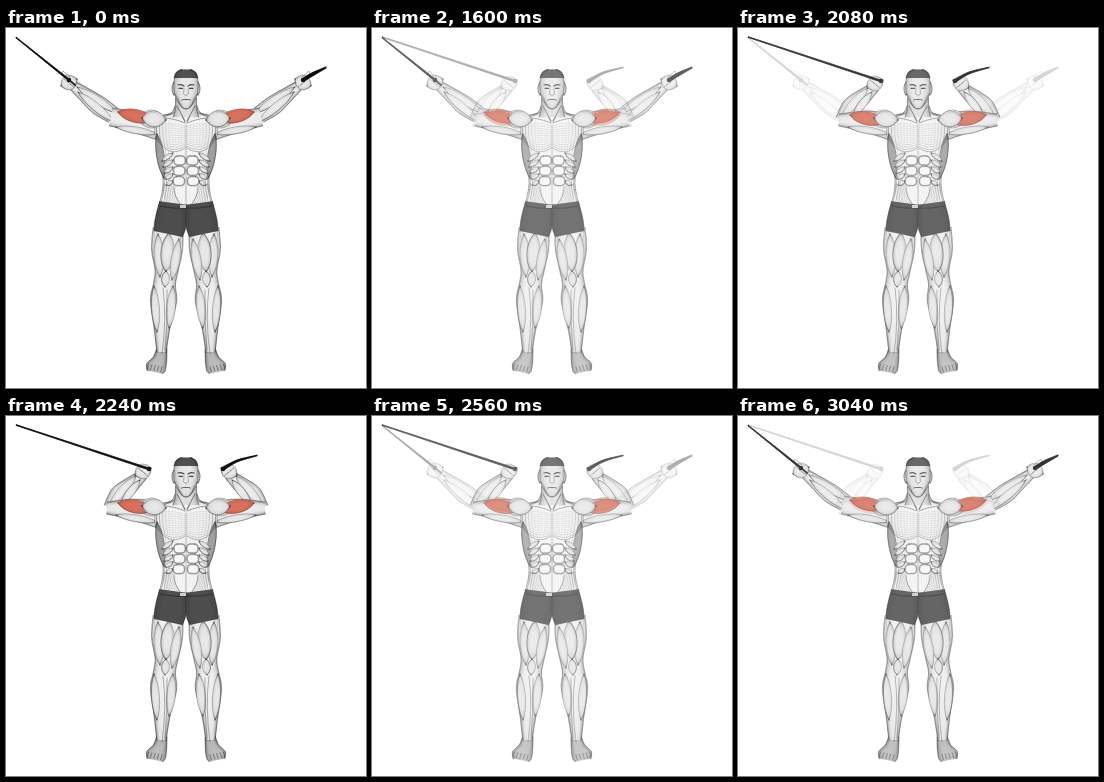
These frames come from a looping animation (360x360 px, 3200 ms). An HTML page with a canvas:

```html
<!DOCTYPE html>
<html lang="en">
<head>
<meta charset="utf-8">
<style>
  html, body { margin: 0; width: 100%; height: 100%; overflow: hidden; background: #fff; }
  canvas { display: block; width: 360px; height: 360px; }
</style>
</head>
<body>
<canvas id="stage"></canvas>
<script>
const SIZE = 360, LOOP = 3200, HOLD = 1440, STEP = 160, FADE_STEPS = 6;
const SKIN = '#f7f7f7', RED = '#dd7864', BLACK = '#111';
const dpr = window.devicePixelRatio || 1;
let g;

function sizeCanvas(canvas) {
  canvas.width = canvas.height = SIZE * dpr;
  const context = canvas.getContext('2d');
  context.scale(dpr, dpr);
  context.lineCap = context.lineJoin = 'round';
  return context;
}

function stroke(path, alpha, width = .6, rgb = '20,20,20') {
  g.lineWidth = width;
  g.strokeStyle = `rgba(${rgb},${alpha})`;
  g.stroke(path);
}

const line = (d, alpha = .6, width = .7) => stroke(new Path2D(d), alpha, width);

function fill(path, color) {
  g.fillStyle = color;
  g.fill(path);
}

// Smooth curve through all points, appended to the path.
function trace(path, points) {
  path.lineTo(...points[0]);
  for (let i = 0; i < points.length - 1; i++) {
    const a = points[i], b = points[i + 1];
    const before = points[i - 1] || a, after = points[i + 2] || b;
    path.bezierCurveTo(
      a[0] + (b[0] - before[0]) / 6, a[1] + (b[1] - before[1]) / 6,
      b[0] - (after[0] - a[0]) / 6, b[1] - (after[1] - a[1]) / 6, ...b);
  }
  return path;
}

// Stations are [x, y, radius]; u = -1 and 1 give the two sides.
function rail(stations, u) {
  return stations.map(([x, y, radius], i) => {
    const a = stations[i - 1] || stations[i], b = stations[i + 1] || stations[i];
    const dx = b[0] - a[0], dy = b[1] - a[1], k = radius * u / Math.hypot(dx, dy);
    return [x - dy * k, y + dx * k];
  });
}

// Tapered tube with engraved lines that darken towards its sides.
function limb(stations, color = SKIN, edge = .42) {
  const outline = trace(new Path2D(), rail(stations, -1));
  trace(outline, rail(stations, 1).reverse());
  outline.closePath();
  fill(outline, color);
  for (let u = -.95; u < 1; u += .1) {
    stroke(trace(new Path2D(), rail(stations, u)), .05 + edge * u ** 4, .9);
  }
  stroke(trace(new Path2D(), rail(stations, -1)), .65);
  stroke(trace(new Path2D(), rail(stations, 1)), .65);
}

// Spindle of strands between two tendons.
function muscle(x1, y1, x2, y2, width, color = SKIN, rgb = '20,20,20') {
  const dx = x2 - x1, dy = y2 - y1, length = Math.hypot(dx, dy);
  const strand = (path, u, flip) => {
    const k = width * u * 4 / 3 / length;
    const at = s => [x1 + dx * s - dy * k, y1 + dy * s + dx * k];
    if (flip) path.bezierCurveTo(...at(.78), ...at(.22), x1, y1);
    else { path.moveTo(x1, y1); path.bezierCurveTo(...at(.22), ...at(.78), x2, y2); }
    return path;
  };
  fill(strand(strand(new Path2D(), 1), -1, true), color);
  const gap = Math.min(.4, 1.3 / width);
  for (let u = -1; u <= 1; u += gap) stroke(strand(new Path2D(), u), .14 + .4 * u ** 4, .6, rgb);
  stroke(strand(new Path2D(), 1), .55, .6, rgb);
}

function bothSides(draw) {
  draw();
  g.save();
  g.translate(SIZE, 0);
  g.scale(-1, 1);
  draw();
  g.restore();
}

function leg() {
  limb([[156, 320, 5], [154, 331, 7], [150, 339, 10], [149, 344, 8]], '#c4c4c4');
  for (let toe = 0; toe < 5; toe++) {
    line(`M${141 + toe * 3.4} ${341 + toe * .7}l1.5 -5`, .6);
  }
  limb([[162, 200, 15], [161, 222, 15.5], [160.5, 243, 11.5], [158.5, 256, 11],
    [157.5, 273, 13.2], [156, 300, 8], [155.5, 324, 4.7]]);
  muscle(152, 206, 154, 249, 5);
  muscle(163, 205, 160, 244, 6.5);
  muscle(173, 211, 166, 252, 4.5);
  muscle(160, 243, 159, 259, 4);
  muscle(148, 258, 151, 304, 4);
  muscle(167, 258, 163, 300, 4.5);
  line('M157 260Q161 290 156 326M161 262Q162 292 159 322', .45);
}

function torso() {
  limb([[180, 78, 11], [180, 85, 15], [180, 90, 29], [180, 106, 31], [180, 124, 27],
    [180, 145, 24], [180, 158, 23], [180, 178, 27]]);
  bothSides(() => {
    muscle(151, 106, 158, 150, 4, '#aaa');
    for (let i = 0; i < 5; i++) muscle(156 + i, 133 + i * 6, 167, 125 + i * 7, 2.3);
    for (let i = 0; i < 7; i++) {
      line(`M${157 + i * 1.5} 156Q${156 + i * 2} 168 ${162 + i * 2} 176`, .28, .5);
    }
    // Chest strands spread from the armpit to the breastbone.
    for (let t = 0; t <= 1; t += .08) {
      line(`M150 ${98 + 12 * t}Q162 ${93 + 40 * t} 179 ${98 + 23 * t}`, .16 + .5 * t ** 8, .6);
    }
    for (let row = 0; row < 3; row++) {
      const block = new Path2D();
      block.roundRect(168 - row * .4, 128 + row * 10.3, 11.3, 9, 3.5);
      fill(block, SKIN);
      stroke(block, .2, 1.8);
      stroke(block, .5, .6);
    }
    line('M168 159Q168 169 175 177', .5);
    line('M179 95Q165 89 152 90M171 79L179 94M169 84Q161 89 152 90', .55);
  });
  line('M180 97V176', .4);
}

function shorts() {
  limb([[166.7, 175, 13.3], [165, 188, 15], [164, 198, 15.8], [162.3, 206, 14.5]], '#505050', .3);
  line('M154 178Q166 181 180 180', .7);
}

function head() {
  limb([[180, 70, 10.5], [180, 82, 11], [180, 89, 13]], '#e6e6e6');
  bothSides(() => {
    line('M171 78L179 93', .5, 1);
    muscle(168, 54, 168, 67, 2);
  });
  limb([[180, 43, 7], [180, 48, 11], [180, 60, 12.3], [180, 70, 10], [180, 79, 4.5]], '#f0f0f0');
  limb([[180, 41.5, 5], [180, 44.5, 10], [180, 50, 12]], '#555');
  bothSides(() => {
    line('M172 57Q175 56 178 58M173 60.3H176.5', .75, 1.2);
    line('M178 60L177.5 66L180 67.5M169 66Q173 70 174 77', .4);
    line('M175.5 72Q178 71 180 71.5M176 79.5Q178 81 180 81', .6, 1);
  });
}

function upperArm(elbow, biceps) {
  limb([elbow, [128, 93.5, 10.5], [153, 99, 13]]);
  muscle(110, 99, 151, 106, 3.5);
  muscle(132, 91, 159, 91, 9);
  muscle(...biceps, 6.5, RED, '125,30,20');
}

function hand(x, y) {
  muscle(x - 8, y + 4, x + 8, y - 3, 7.5);
  for (let finger = 0; finger < 3; finger++) {
    line(`M${x - 5 + finger * 3} ${y - 3 + finger * 2.5}l4 3`, .5);
  }
}

function openArm() {
  limb([[65, 56, 4.5], [78, 66, 7], [92, 77, 9.5], [107, 87, 8.5]]);
  muscle(71, 59, 111, 85, 4);
  muscle(72, 64, 108, 94, 4);
  upperArm([105, 89, 9], [112, 84, 148, 92]);
  hand(63, 54);
  line('M59 50Q55 46 57 43L64 49', .5);
}

function bentArm() {
  limb([[137, 59, 5], [125, 69, 8], [114, 79, 10], [105, 93, 8]]);
  muscle(130, 60, 103, 90, 4.5);
  muscle(134, 64, 115, 88, 4);
  upperArm([101, 92, 6], [112, 87, 147, 94]);
  hand(137, 55);
}

function grip(x, y) {
  const knob = new Path2D();
  knob.arc(x, y, 2.2, 0, Math.PI * 2);
  fill(knob, BLACK);
}

function openCables() {
  limb([[10, 9.5, .35], [63, 52, .9]], BLACK);
  grip(63, 52);
  line('M62 51L69 57', .9, 2);
  limb([[297, 52, 1.6], [307, 46, 1.6], [320, 39.5, .6]], BLACK);
  grip(297, 52);
}

function bentCables() {
  limb([[10, 9, .35], [143, 53, .9]], BLACK);
  grip(143, 53);
  limb([[217, 53, 1.4], [231, 45, 1], [251, 39.5, .3]], BLACK);
  grip(217, 53);
}

function makePose(arm, cables) {
  const canvas = document.createElement('canvas');
  g = sizeCanvas(canvas);
  bothSides(leg);
  bothSides(arm);
  torso();
  bothSides(() => muscle(136, 90, 160, 92, 8));
  bothSides(shorts);
  g.fillStyle = '#ccc';
  g.fillRect(174, 177, 6, 3);
  head();
  cables();
  return canvas;
}

const openPose = makePose(openArm, openCables);
const bentPose = makePose(bentArm, bentCables);
const screen = sizeCanvas(document.getElementById('stage'));

function drawPose(pose, alpha) {
  screen.globalAlpha = alpha;
  screen.drawImage(pose, 0, 0, SIZE, SIZE);
}

// Stepped fade to the bent pose and back.
function bentAmount(time) {
  if (time < HOLD) return 0;
  const step = Math.floor((time - HOLD) / STEP) + 1;
  return 1 - Math.abs(step - FADE_STEPS) / FADE_STEPS;
}

const start = performance.now();
function frame() {
  const amount = bentAmount((performance.now() - start) % LOOP);
  screen.globalAlpha = 1;
  screen.fillStyle = '#fff';
  screen.fillRect(0, 0, SIZE, SIZE);
  drawPose(openPose, 1 - amount);
  drawPose(bentPose, amount);
  requestAnimationFrame(frame);
}
frame();
</script>
</body>
</html>
```
